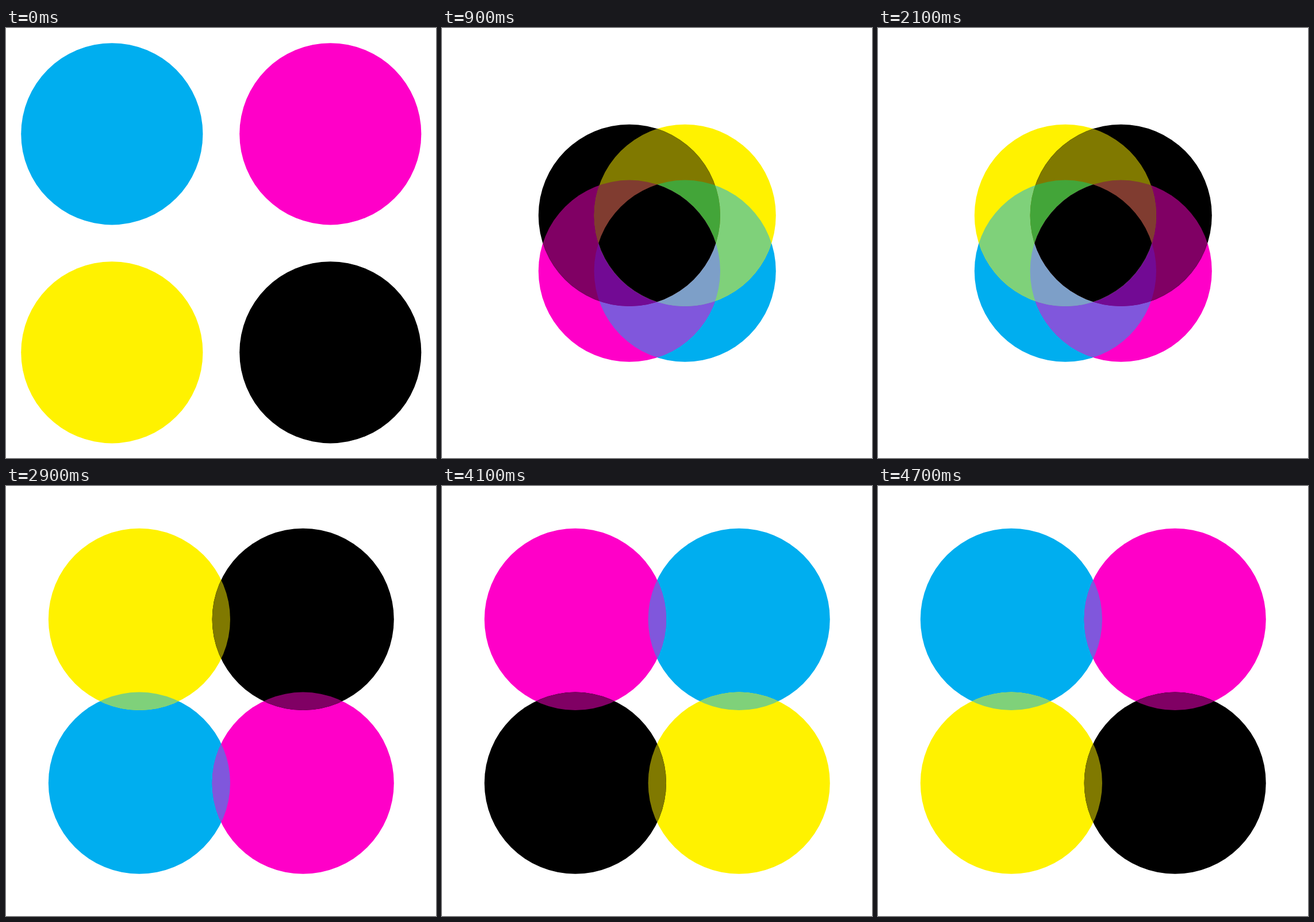
An HTML page with a canvas for the animation above (4800 ms loop, 748 by 748 pixels).

```html
<!DOCTYPE html>
<html lang="en">
<head>
<meta charset="utf-8">
<title>CMYK circles</title>
<style>
  html, body { margin: 0; width: 100%; height: 100%; overflow: hidden; background: #fff; }
  canvas { display: block; width: 748px; height: 748px; }
</style>
</head>
<body>
<canvas id="stage"></canvas>
<script>
const SIZE = 748, MID = 374.3, RADIUS = 158.1;
const HOLD = 500, STEP = 100, PHASE = 1200;

// Inks at top left, top right, bottom left, bottom right
const LAYOUTS = ["CMYK", "KYMC", "YKCM", "MCKY"];

// Distance of each centre from the middle, by steps away from the meeting point
const OFFSETS = [0, 48.4, 95.2, 142.4, 190];

// Colour of each overlap, inks in alphabetical order
const COLORS = {
  C: "#00aeef", M: "#ff00c8", Y: "#fff200", K: "#000",
  CM: "#8057dc", CY: "#7fd17a", KM: "#800064", KY: "#807900",
  CKM: "#720a94", CKY: "#43a539", CMY: "#7d9fc8", KMY: "#803c30",
  CKMY: "#000"
};

const canvas = document.getElementById("stage");
const ctx = canvas.getContext("2d");
const ratio = window.devicePixelRatio || 1;
canvas.width = canvas.height = SIZE * ratio;
ctx.scale(ratio, ratio);

function circle({ x, y }) {
  ctx.beginPath();
  ctx.arc(x, y, RADIUS, 0, Math.PI * 2);
}

// Fills the area shared by all the given inks
function fillShared(inks, centres) {
  ctx.save();
  [...inks].forEach((ink, i) => {
    circle(centres[ink]);
    if (i < inks.length - 1) ctx.clip();
  });
  ctx.fillStyle = COLORS[inks];
  ctx.fill();
  ctx.restore();
}

function draw(layout, offset) {
  const centres = {};
  [...layout].forEach((ink, i) => {
    centres[ink] = {
      x: MID + (i % 2 ? offset : -offset),
      y: MID + (i > 1 ? offset : -offset)
    };
  });
  ctx.fillStyle = "#fff";
  ctx.fillRect(0, 0, SIZE, SIZE);
  const areas = offset ? Object.keys(COLORS) : ["K"];
  areas.forEach(inks => fillShared(inks, centres));
}

let shown = -1;

function frame(now) {
  const t = now % (PHASE * LAYOUTS.length);
  const phase = Math.floor(t / PHASE);
  const step = Math.max(0, Math.floor((t % PHASE - HOLD) / STEP) + 1);
  const key = phase * 8 + step;
  if (key !== shown) {
    shown = key;
    const next = step >= 4 ? phase + 1 : phase;
    draw(LAYOUTS[next % LAYOUTS.length], OFFSETS[Math.abs(4 - step)]);
  }
  requestAnimationFrame(frame);
}

frame(0);
</script>
</body>
</html>
```
